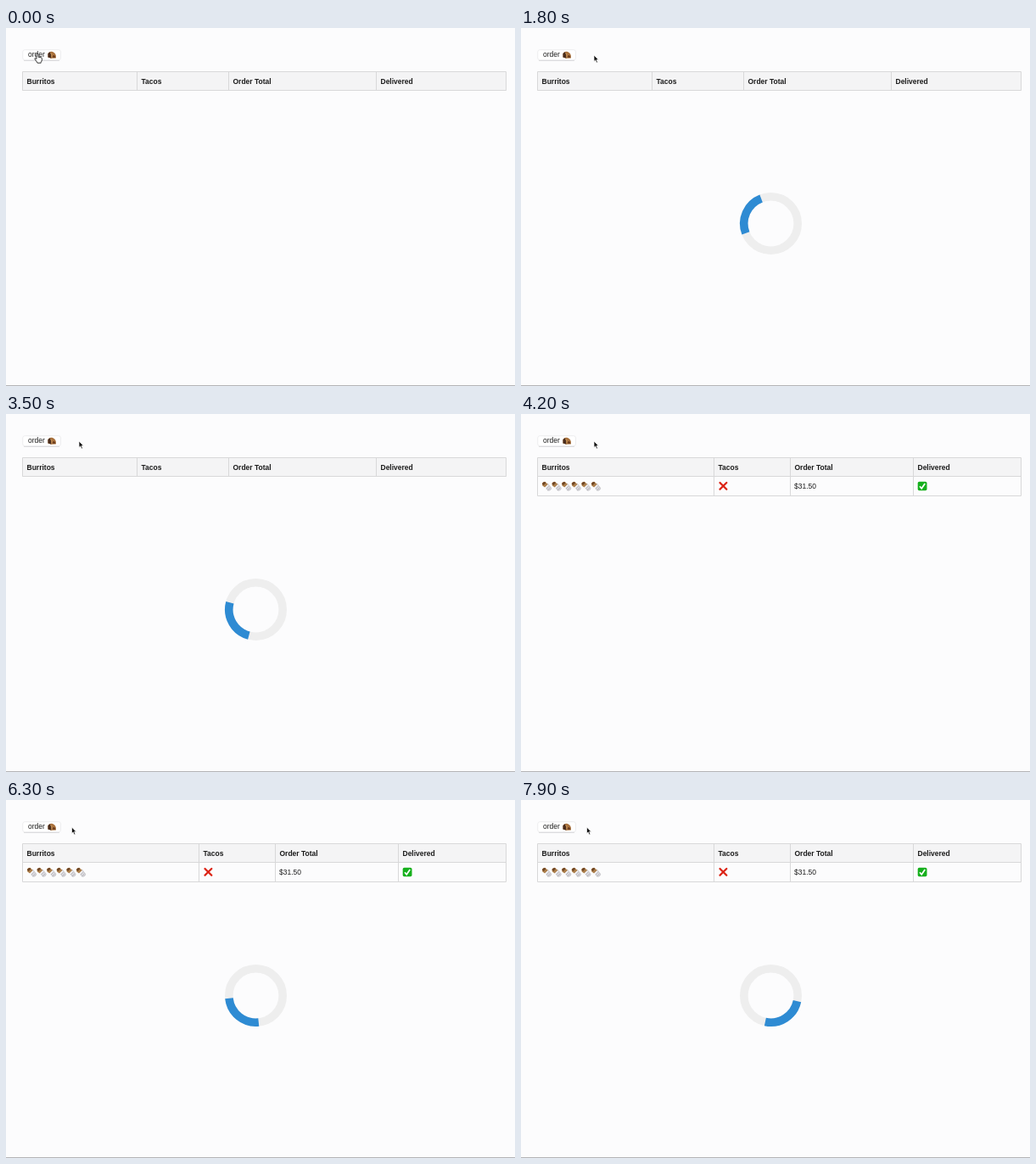
An HTML page that plays this animation: 600x422 px, repeating every 8 s.

```html
<!DOCTYPE html>
<html lang="en">
<head>
<meta charset="utf-8">
<title>Order table</title>
<style>
  html, body { margin: 0; width: 100%; height: 100%; overflow: hidden; background: #fcfcfd; }
  svg { display: block; width: 100%; height: 100%; }
  text { font: 8.5px "Liberation Sans", Arial, sans-serif; fill: #1c1c1c; }
  .head { font-weight: bold; }
  .grid { fill: none; stroke: #d8d8d9; }
  .pressed rect { fill: url(#blue); stroke: #3f8df0; }
  .pressed text { fill: #fff; }
</style>
</head>
<body>
<svg viewBox="0 0 600 422">
  <defs>
    <linearGradient id="blue" x2="0" y2="1">
      <stop stop-color="#6bb2fa"/><stop offset="1" stop-color="#1672f2"/>
    </linearGradient>
    <g id="burrito">
      <path d="M3.5 4.5 7 2.5 11.2 7.7Q11.3 10 8.8 10.7L7 10.6Z" fill="#dcdbe0" stroke="#a9a7ad" stroke-width=".5"/>
      <path d="M.3 2.6Q1.6.1 4.2.4L7.3 3.6 3.6 7 .8 5Z" fill="#ad7f4b"/>
      <path d="M.4 2.4Q1.8.2 4 .4L4.6 2 2 4.5Z" fill="#6d4525"/>
      <path d="M3.6 7 7.3 3.6 8 5.3 5 8.6Z" fill="#f2f1f3"/>
      <path d="M5.2 8.6 8.3 5.5M7.1 10.3 10 7.5" stroke="#98959c" stroke-width=".6"/>
    </g>
    <g id="cross" stroke="#dc2416" stroke-width="2.3" stroke-linecap="round">
      <path d="M1.5 1.5 9.3 9.3M9.3 1.5 1.5 9.3"/>
    </g>
    <g id="check">
      <rect x=".2" y=".2" width="10.8" height="10.6" rx="1.8" fill="#16b01d"/>
      <path d="M2.5 5.8 4.7 8.3 8.7 2.6" fill="none" stroke="#fff" stroke-width="1.7"/>
    </g>
  </defs>

  <path d="M0 421.5H600" stroke="#b4b4b6"/>

  <g id="button">
    <path d="M21.5 38.3H62.5" stroke="#d0d0d2" stroke-width=".9" stroke-linecap="round"/>
    <rect x="19.7" y="25.7" width="44.8" height="12" rx="2.6" fill="#fff" stroke="#e6e6e8" stroke-width=".7"/>
    <text x="26" y="34">order</text>
    <path d="M49.5 34.6V30.5Q50.7 27.3 53.8 27.7 57.6 28.2 58.8 32.3L58.9 35.6 53.5 35.8Z" fill="#a9713c"/>
    <path d="M49.5 34.6V30.5Q50.4 28.3 52.2 28.6 53.6 31.6 53.5 35.8Z" fill="#4a2d1c"/>
    <path d="M54.2 34.8Q54.8 31.8 56.6 32 58.3 32.5 58.4 35Z" fill="#70401f"/>
    <path d="M52.6 29.3Q54.4 31.2 54 35.3" fill="none" stroke="#d8a76a" stroke-width=".8"/>
  </g>

  <g id="empty"></g>
  <g id="filled"></g>

  <g id="spinner" fill="none" stroke-width="9.6">
    <circle cx="294.5" cy="230.5" r="31.7" stroke="#eee"/>
    <circle id="arc" cx="294.5" cy="230.5" r="31.7" stroke="#2e8bd3" pathLength="360" stroke-dasharray="90 270"/>
  </g>

  <path id="hand" fill="#fff" stroke="#222" stroke-width=".9" stroke-linejoin="round"
    d="M-1 1a1 1 0 0 1 2 0v3.2l3 .5q1.6.3 1.5 1.8l-.5 2.5-.8 1.5v.7h-4.2l-.6-1.2-2.4-3.3q-.5-1 .4-1.2.7 0 1.6 1z"/>
  <path id="arrow" fill="#111" stroke="#fff" stroke-width=".7" d="M0 0V7.4L1.7 5.9 3 9 4.4 8.4 3.1 5.4H5.3Z"/>
</svg>
<script>
const $ = id => document.getElementById(id);
const LOOP = 8000, STEP = 100;
const titles = ['Burritos', 'Tacos', 'Order Total', 'Delivered'];

// Column positions are the left borders; each cell is padded by 5 px.
function table(columns, bottom) {
  const lines = columns.slice(1).map(x => `M${x} 51.5V${bottom}`).join('');
  const heads = titles.map((title, i) => `<text class="head" x="${columns[i] + 5}" y="65.8">${title}</text>`).join('');
  return `<rect x="19.5" y="51.5" width="570" height="22" fill="#f4f4f5"/>
    <path class="grid" d="M19.5 51.5H589.5V${bottom}H19.5ZM19.5 73.5H589.5${lines}"/>${heads}`;
}

const icon = (name, x) => `<use href="#${name}" x="${x}" y="79.5"/>`;

$('empty').innerHTML = table([19.5, 154.5, 262.5, 436.5], 73.5);
$('filled').innerHTML = table([19.5, 227.5, 317.5, 462.5], 96.5)
  + Array.from({ length: 6 }, (_, i) => icon('burrito', 24.5 + 11.6 * i)).join('')
  + icon('cross', 233) + '<text x="322" y="88">$31.50</text>' + icon('check', 467.5);

// Pointer path: time, x, y
const path = [
  [0, 37, 30], [500, 37, 30], [900, 86, 32], [4300, 86, 32], [4700, 11, 33],
  [4900, 31, 31], [5400, 31, 31], [6000, 77.5, 32], [LOOP, 77.5, 32]
];

function pointer(t) {
  const i = path.findIndex(p => p[0] > t);
  const [t0, x0, y0] = path[i - 1], [t1, x1, y1] = path[i];
  const u = (t - t0) / (t1 - t0), k = u * u * (3 - 2 * u);
  return [x0 + (x1 - x0) * k, y0 + (y1 - y0) * k];
}

const show = (id, on) => $(id).setAttribute('display', on ? 'inline' : 'none');

function draw(now) {
  const t = Math.floor(now % LOOP / STEP) * STEP;
  const delivered = t >= 4200;
  const loadStart = delivered ? 5083 : 167;
  const [x, y] = pointer(t);
  const over = x > 20 && x < 65;

  show('empty', !delivered);
  show('filled', delivered);
  show('spinner', t >= loadStart);
  // One turn every two seconds; the arc is centred on the top at first.
  $('arc').setAttribute('transform', `rotate(${(t - loadStart) * 0.18 - 135} 294.5 230.5)`);
  $('button').setAttribute('class', t === 100 || t === 5000 ? 'pressed' : '');

  show('hand', over);
  show('arrow', !over);
  $(over ? 'hand' : 'arrow').setAttribute('transform', `translate(${x} ${y})`);
}

const start = performance.now();
function tick() {
  draw(performance.now() - start);
  requestAnimationFrame(tick);
}
tick();
</script>
</body>
</html>
```
